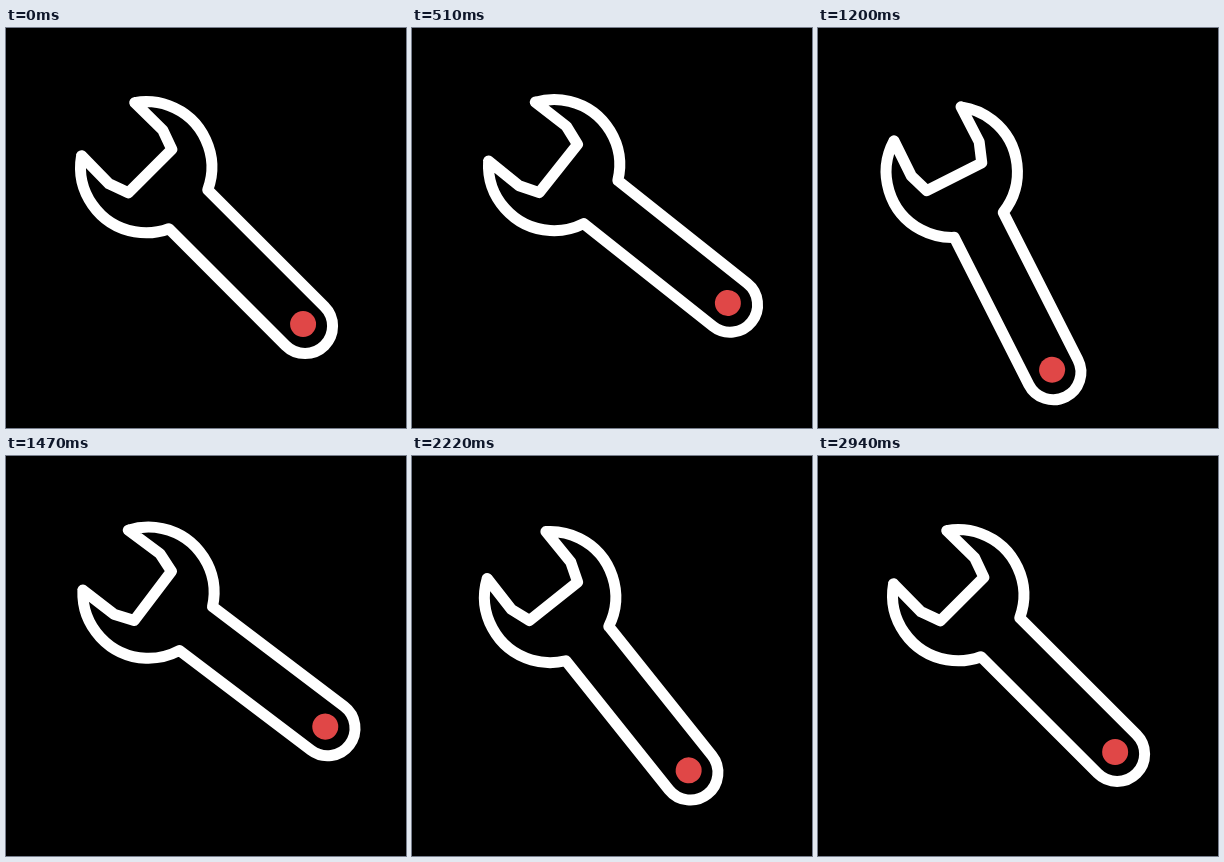
An HTML page with a canvas for the animation above (2970 ms loop, 400 by 400 pixels).

```html
<!DOCTYPE html>
<html lang="en">
<head>
<meta charset="utf-8">
<title>Wrench</title>
<style>
  html, body { margin: 0; width: 100%; height: 100%; overflow: hidden; background: #000; }
  canvas { display: block; width: 400px; height: 400px; }
</style>
</head>
<body>
<canvas id="stage" width="400" height="400"></canvas>
<script>
const ctx = document.getElementById('stage').getContext('2d');
const LOOP = 2970, STEP = 30;
const PIVOT = { x: 122.5, y: 121.5 };
const REST = 45, DOWN = 22, UP = -10;

// Each swing: end time, end angle, horizontal bezier handles
const swings = [
  [190, DOWN, 0.333, 0.667],
  [710, UP, 0.333, 0.2],
  [1114, DOWN, 0.78, 0.44],
  [1634, UP, 0.333, 0.2],
  [2068, DOWN, 0.78, 0.44],
  [2467, UP, 0.333, 0.365],
  [LOOP, 0, 0.333, 0.2]
];

// Cubic bezier easing (x1,0,x2,1), solved by bisection
function ease(s, x1, x2) {
  let lo = 0, hi = 1, u = s;
  for (let i = 0; i < 24; i++) {
    u = (lo + hi) / 2;
    const v = 1 - u;
    const x = 3 * x1 * u * v * v + 3 * x2 * u * u * v + u * u * u;
    if (x < s) lo = u; else hi = u;
  }
  return u * u * (3 - 2 * u);
}

function angleAt(t) {
  let start = 0, from = 0;
  for (const [end, to, x1, x2] of swings) {
    if (t < end) return from + (to - from) * ease((t - start) / (end - start), x1, x2);
    start = end;
    from = to;
  }
  return 0;
}

// Outline in the wrench's own frame: pivot at 0,0 and handle along +x
function wrenchPath() {
  const head = { x: 25, r: 65.6 };
  const neck = { x: 84.6, y: 27.5 };
  const tip = { x: -28.8, y: 37.6 };
  const neckA = Math.atan2(neck.y, neck.x - head.x);
  const tipA = Math.atan2(tip.y, tip.x - head.x);
  const p = new Path2D();
  p.moveTo(tip.x, -tip.y);
  p.lineTo(10.5, -38);
  p.lineTo(30.5, -30.8);
  p.lineTo(30.5, 30.8);
  p.lineTo(10.5, 38);
  p.lineTo(tip.x, tip.y);
  p.arc(head.x, 0, head.r, tipA, neckA, true);
  p.arc(249.7, 0, neck.y, Math.PI / 2, -Math.PI / 2, true);
  p.lineTo(neck.x, -neck.y);
  p.arc(head.x, 0, head.r, -neckA, -tipA, true);
  p.closePath();
  return p;
}

const wrench = wrenchPath();

function draw(t) {
  ctx.setTransform(1, 0, 0, 1, 0, 0);
  ctx.fillStyle = '#000';
  ctx.fillRect(0, 0, 400, 400);
  ctx.translate(PIVOT.x, PIVOT.y);
  ctx.rotate((REST + angleAt(t)) * Math.PI / 180);
  ctx.lineWidth = 11;
  ctx.lineJoin = 'round';
  ctx.strokeStyle = '#fff';
  ctx.stroke(wrench);
  ctx.fillStyle = '#e04747';
  ctx.beginPath();
  ctx.arc(246.9, 0, 13, 0, Math.PI * 2);
  ctx.fill();
}

const begin = performance.now();
function tick() {
  const t = (performance.now() - begin) % LOOP;
  draw(Math.floor(t / STEP) * STEP);
  requestAnimationFrame(tick);
}
tick();
</script>
</body>
</html>
```
